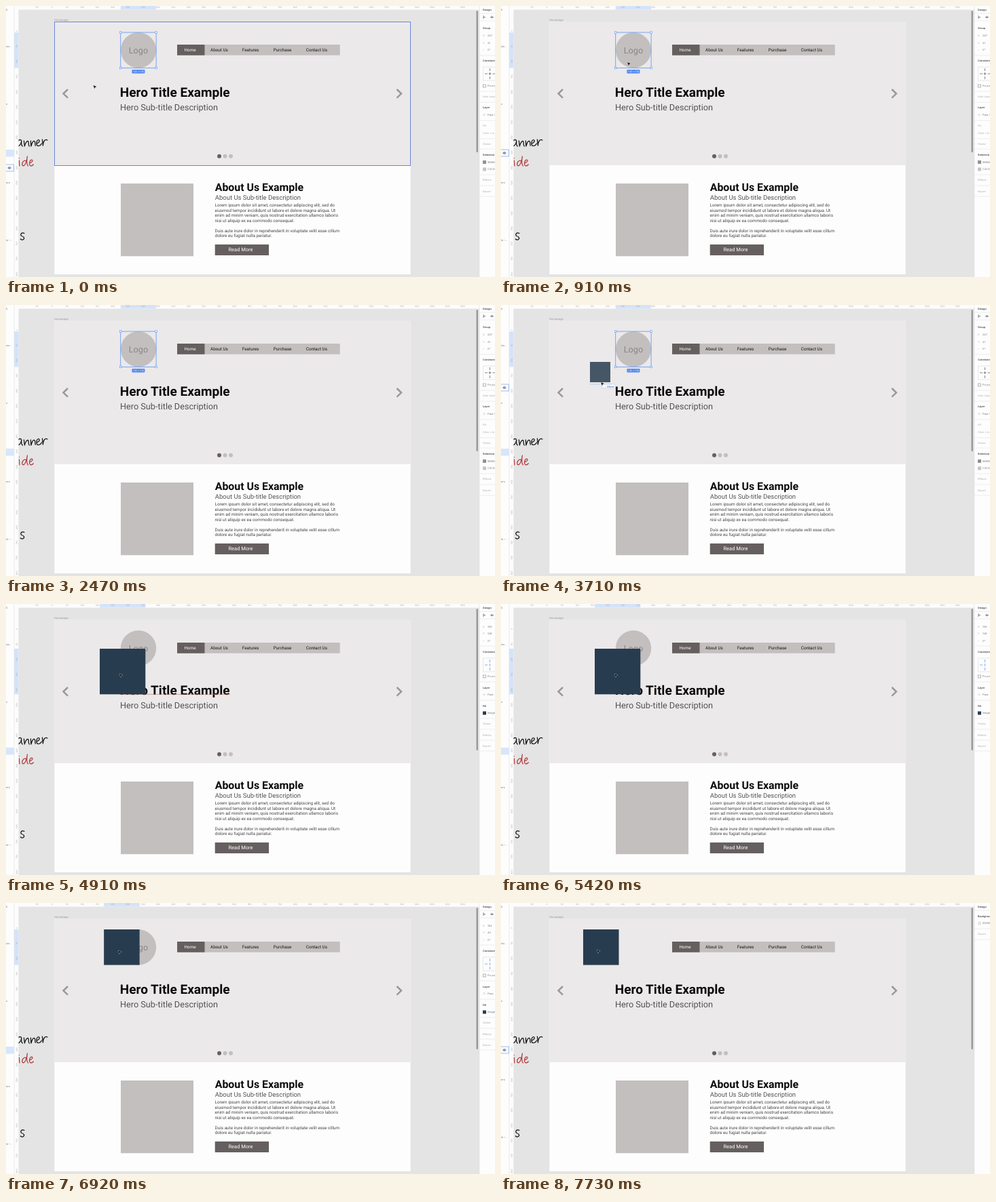
Recreate the animation shown at these times as an HTML page. Size 720x400 px, loop 8000 ms.

```html
<!DOCTYPE html>
<html lang="en">
<head>
<meta charset="utf-8">
<title>Wireframe editor</title>
<style>
  html, body { margin: 0; width: 100%; height: 100%; overflow: hidden; background: #e4e4e4; }
  svg { display: block; width: 720px; height: 400px; }
  text { font-family: Roboto, sans-serif; text-rendering: geometricPrecision; }
  .b { font-weight: 700; }
  .ui text { font: 3.8px Inter, sans-serif; fill: #777; }
  .ui .h { font-weight: 600; fill: #444; }
  .ui .dim { fill: #aaa; }
  .body text { font-size: 6.35px; fill: #444; }
  .nav text { font-size: 6.35px; fill: #161414; }
  .ink { fill: none; stroke: #111; stroke-width: 1.25; stroke-linecap: round; stroke-linejoin: round; }
</style>
</head>
<body>
<svg viewBox="0 0 720 400" xmlns="http://www.w3.org/2000/svg">
  <rect width="720" height="400" fill="#e4e4e4"/>

  <g class="ink" transform="translate(-.6 0)">
    <path d="M23 198C19 196 16 201 17 205C18 209 23 205 23.500 199C23 203 23 206 25 207M27 199L28 207C29 202 32 198 33.500 200C34.500 202 33 206 35 207M37 199L37.500 207C39 201 41 198 43 200C44 202 43 205 44 206M46 203C50 202 51 198 48.500 197.500C45 198 44.500 206 48 206.500C50 206.500 52 205 53 203M54 197L55 206C55 200 58 196 61.500 198"/>
    <path stroke="#b03a3c" d="M20 228L20.500 236M20 224.500v.2M31 229C27 226 23 232 25 235.500C28 237 31 231 32 222C31 228 31 234 33 236M35 232C39 231 41 228 38.500 227C35 227 34 235 37 236C39 236 40 235 41 234"/>
    <path d="M27.500 335.500C23.500 333.500 21 337.500 23.500 339.500C27.500 340.500 28.500 343.500 25.500 345C24 345.500 22.500 344.500 22 344"/>
  </g>

  <rect x="71.300" y="23" width="524.400" height="373" fill="#fefdfd"/>
  <rect x="71.300" y="23" width="524.400" height="212" fill="#ebe9ea"/>
  <text x="71" y="21.800" font-size="4" fill="#999" style="font-family:Inter,sans-serif">Homepage</text>

  <g id="logo">
    <circle cx="195" cy="65.200" r="26.200" fill="#c3bfbf"/>
    <text x="180.700" y="69.500" font-size="12.700" fill="#8a8686">Logo</text>
  </g>

  <g class="nav">
    <rect x="252" y="57" width="239.700" height="15.700" fill="#c3bfbf"/>
    <rect x="252" y="57" width="40.500" height="15.700" fill="#665f60"/>
    <text x="262.500" y="67" style="fill:#fff">Home</text>
    <text x="301" y="67">About Us</text>
    <text x="347.800" y="67">Features</text>
    <text x="393.800" y="67">Purchase</text>
    <text x="441.800" y="67">Contact Us</text>
  </g>

  <path d="M91 123L84.500 129.300L91 135.600M575.500 123L582 129.300L575.500 135.600" fill="none" stroke="#9c9899" stroke-width="2.500"/>
  <text class="b" x="167.800" y="133.500" font-size="19.050" fill="#0b0a0a">Hero Title Example</text>
  <path id="underline" d="M168 133.300H330" stroke="#b98a74" stroke-width=".7"/>
  <text x="168" y="154" font-size="12.700" fill="#565253">Hero Sub-title Description</text>
  <circle cx="314" cy="221.800" r="3" fill="#665f60"/>
  <circle cx="322.500" cy="221.800" r="3" fill="#c3bfbf"/>
  <circle cx="331" cy="221.800" r="3" fill="#c3bfbf"/>

  <rect x="169" y="262" width="107" height="107.300" fill="#c3bfbf"/>
  <text class="b" x="307.700" y="273.100" font-size="15.880" fill="#0b0a0a">About Us Example</text>
  <text x="307.700" y="285.700" font-size="9.530" fill="#565253">About Us Sub-title Description</text>
  <g class="body">
    <text x="307.600" y="296.300">Lorem ipsum dolor sit amet, consectetur adipiscing elit, sed do</text>
    <text x="307.600" y="303.750">eiusmod tempor incididunt ut labore et dolore magna aliqua. Ut</text>
    <text x="307.600" y="311.200">enim ad minim veniam, quis nostrud exercitation ullamco laboris</text>
    <text x="307.600" y="318.650">nisi ut aliquip ex ea commodo consequat.</text>
    <text x="307.600" y="333.550">Duis aute irure dolor in reprehenderit in voluptate velit esse cillum</text>
    <text x="307.600" y="341">dolore eu fugiat nulla pariatur.</text>
  </g>
  <rect x="307.700" y="352" width="79.300" height="16" fill="#665f60"/>
  <text x="327.500" y="362.400" font-size="7.500" fill="#fff">Read More</text>

  <rect id="hover" x="71.500" y="23.500" width="524" height="212" fill="none" stroke="#6d86d8"/>
  <rect id="image" fill="#283c4f"/>
  <path id="guides" d="M252.400 5V39M71 72H219" stroke="#a9c4ee" stroke-width=".8" stroke-dasharray="2 1"/>

  <g id="select">
    <rect id="frame" fill="none" stroke="#6b9cf0" stroke-width=".9"/>
    <g id="handles" fill="#fff" stroke="#6b9cf0" stroke-width=".7"></g>
    <g id="badge">
      <rect x="-9.500" y="2.700" width="19" height="5.300" rx=".8" fill="#4f86ee"/>
      <text id="size" y="6.700" font-size="3.800" fill="#fff" text-anchor="middle"></text>
    </g>
  </g>

  <g id="drag">
    <rect x="-16" y="-30" width="30" height="30" fill="#283c4f" opacity=".85"/>
    <path d="M-17 2.800H16" stroke="#9bb4dd" stroke-width=".6"/>
    <rect x="2" y="3" width="19" height="6" fill="#fafcff" stroke="#b5c4de" stroke-width=".5"/>
    <text x="4" y="7.600" font-size="4.200" fill="#3c65b0">→ Move</text>
  </g>

  <rect x="692.500" y="7" width="2.500" height="209" rx="1.200" fill="#999"/>

  <g class="ui">
    <rect width="697" height="5.500" fill="#fcfcfc"/>
    <rect x="12" y="5" width="6.500" height="395" fill="#fcfcfc"/>
    <rect id="markX" height="5.500" fill="#d5e3fa"/>
    <rect id="markY" x="12" width="6.500" fill="#d5e3fa"/>
    <g id="ruler"></g>

    <rect width="12" height="400" fill="#fdfdfd"/>
    <path d="M12 0V400" stroke="#e2e2e2" stroke-width=".7"/>
    <rect id="row" y="212" width="12" height="10.500" fill="#d8e6fc"/>
    <text y="61.200">sio…</text>
    <text y="7">5</text>
    <text y="145.500">n</text>
    <g id="lower"><text y="261.500">ers</text><text y="346.500">le –…</text></g>
    <g id="eye">
      <rect x="-1" y="-5" width="12.500" height="10" fill="#f8faff" stroke="#8db0ee" stroke-width=".8"/>
      <ellipse cx="5" rx="2" ry="1.300" fill="none" stroke="#444" stroke-width=".7"/>
      <circle cx="5" r=".7" fill="#444"/>
    </g>

    <rect x="697" width="23" height="400" fill="#fdfdfd"/>
    <path d="M697 0V400" stroke="#e2e2e2" stroke-width=".7"/>
    <text class="h" x="702" y="6.500">Design</text>
    <g id="group"></g>
    <g id="photo"></g>
    <g id="page"></g>
  </g>

  <path id="cursor" d="M0 0L5 2L2.700 2.900L1.800 5.200Z" fill="#1b1b1b" stroke="#fff" stroke-width=".5" paint-order="stroke"/>
</svg>

<script>
const LOOP = 8000;
const $ = id => document.getElementById(id);
const set = (id, attrs) => { for (const k in attrs) $(id).setAttribute(k, attrs[k]); };
const show = (id, on) => { $(id).style.display = on ? '' : 'none'; };
const move = (id, x, y) => $(id).setAttribute('transform', `translate(${x} ${y})`);
const within = (t, ...spans) => spans.some(([a, b]) => t >= a && t < b);

// Each key: time, then values; equal neighbours make a rest.
const cursorKeys = [
  [0, 128.5, 117], [150, 128.5, 117], [910, 186, 83], [1420, 186, 83],
  [1690, 150, 150], [1960, 150, 150], [2470, -8, 398], [3290, 8, 358],
  [3710, 147, 114], [4280, 171, 100], [4400, 171, 100], [4910, 167, 103],
  [5540, 167, 103], [5900, 248, 76], [6080, 285.5, 105.5], [6500, 271.5, 91.5],
  [6620, 240, 70], [7060, 142, 70], [7220, 190, 72], [7340, 190, 72],
  [7580, 141, 69], [LOOP, 141, 69]
];
const imageKeys = [
  [4400, 138, 66, 67.3], [5540, 138, 66, 67.3], [5900, 219, 39, 67.3],
  [6080, 219, 39, 67.3], [6500, 219, 39, 52.5], [6620, 219, 39, 52.5],
  [7060, 121, 39, 52.5], [LOOP, 121, 39, 52.5]
];
const eyeKeys = [[0, 239], [700, 217], [1420, 239], [1960, 345], [2470, -20],
  [3500, 122], [4280, -20], [7580, 217]];

function at(keys, t) {
  const i = keys.findIndex(k => k[0] > t);
  if (i < 1) return keys[i ? keys.length - 1 : 0].slice(1);
  const a = keys[i - 1], b = keys[i];
  const p = (t - a[0]) / (b[0] - a[0]);
  const e = p * p * (3 - 2 * p);
  return a.slice(1).map((v, n) => v + (b[n + 1] - v) * e);
}

function panel(id, rows, lines) {
  const text = rows.map(([y, s, c = '', x = 702]) =>
    `<text class="${c}" x="${x}" y="${y + 1.4}">${s}</text>`).join('');
  const rules = lines.map(y => `M697 ${y}H720`).join('');
  $(id).innerHTML = `<path d="${rules}" stroke="#e6e6e6" stroke-width=".7"/>${text}`;
}

const box = (y, cross, c) => `<rect x="702.500" y="${y}" width="21" height="20" fill="none" stroke="#ddd" stroke-width=".7"/>
  <path d="M712.500 ${y + 2}v4m0 2v4m0 2v4M705 ${y + 10}h4${cross ? 'm1.500 0h4m2 0h4' : ''}" stroke="${c}" stroke-width=".8"/>`;
const check = y => `<rect x="702.500" y="${y - 2}" width="4" height="4" fill="none" stroke="#888" stroke-width=".6"/>`;
const align = '<path d="M703 14v5m0-2.500h3M713 16.500h5m-2.500-2v4" stroke="#666" stroke-width=".8"/>';
const swatch = (y, c) => `<rect x="702" y="${y - 2.5}" width="5" height="5" fill="${c}"/>`;
const place = (x, y) => [[x, 'X', 'dim'], [x + 10.5, 'Y', 'dim'], [y, '⌐', 'dim'], [y, '0°', '', 709]];

panel('group', [
  [33, 'Group', 'h'], ...place(44, 65), [44, '247', '', 709], [54.5, '41', '', 709],
  [81, 'Constraints', 'h'], [118, 'Fix pos', '', 709], [134, 'Auto Layout', 'dim'],
  [150, 'Layer', 'h'], [160.5, '◇', 'dim'], [160.5, 'Pass T', '', 709], [177, 'Fill', 'dim'],
  [187.5, 'Click + to', 'dim'], [203.5, 'Stroke', 'dim'], [219.5, 'Selection c', 'h'],
  [230.5, '9B9B9B', '', 709], [241, 'C4C4C4', '', 709], [257, 'Effects', 'dim'], [273.5, 'Export', 'dim']
], [11, 22, 73, 126, 142, 169, 196, 211, 249, 265, 281]);
$('group').innerHTML += align + box(90, true, '#666') + check(118) + swatch(230.5, '#929292') + swatch(241, '#c4c4c4');

panel('photo', [
  ...place(33.5, 54.5), [33.5, '<tspan id="px"/>', '', 709], [44, '<tspan id="py"/>', '', 709],
  [70.5, 'Constraints', 'h'], [107, 'Fix pos', '', 709], [123.5, 'Layer', 'h'],
  [134, '◇', 'dim'], [134, 'Pass', '', 709], [150.5, 'Fill', 'h'], [161, 'Image', '', 709],
  [177, 'Stroke', 'dim'], [193.5, 'Effects', 'dim'], [209.5, 'Export', 'dim']
], [11, 22, 62, 115, 142, 169, 185, 201, 217]);
$('photo').innerHTML += align + box(80, false, '#6b9cf0') + check(107) + swatch(161, '#283c4f');

panel('page', [[19.5, 'Background', 'h'], [30, 'E5E5E5', '', 709], [46, 'Export', 'dim']], [11, 38, 54]);
$('page').innerHTML += swatch(30, '#e5e5e5');

let marks = '';
for (let i = 0; i < 29; i++)
  marks += `<text class="dim" x="${45 + i * 22.4}" y="2.600" text-anchor="middle" style="font-size:3.200px">${i * 50 - 50}</text>`;
for (let i = 0; i < 17; i++)
  marks += `<text class="dim" transform="translate(16.500 ${37 + i * 22.4}) rotate(-90)" text-anchor="middle" style="font-size:3.200px">${i * 50}</text>`;
$('ruler').innerHTML = marks;

for (let i = 0; i < 4; i++)
  $('handles').innerHTML += '<rect x="-1.300" y="-1.300" width="2.600" height="2.600"/>';

function select(x, y, w) {
  set('frame', { x, y, width: w, height: w });
  [...$('handles').children].forEach((h, i) =>
    h.setAttribute('transform', `translate(${x + w * (i % 2)} ${y + w * (i >> 1)})`));
  move('badge', x + w / 2, y + w);
  const n = Math.round(w * 2.52);
  $('size').textContent = `${n} × ${n}`;
  set('markX', { x, width: w });
  set('markY', { y, height: w });
}

function draw(t) {
  const [cx, cy] = at(cursorKeys, t);
  const [x, y, w] = at(imageKeys, t);
  const placed = t >= 4400;
  const onImage = within(t, [4400, 7220]);
  const any = t < 7730;

  move('cursor', cx, cy);
  show('cursor', !within(t, [2470, 3290]));
  move('drag', cx, cy);
  show('drag', within(t, [3290, 4400]));

  set('image', { x, y, width: w, height: w });
  show('image', placed);
  show('logo', any);
  if (onImage) select(x, y, w); else select(168.7, 39, 52.4);
  show('select', any && !within(t, [4800, 5900], [6620, 7060]));
  show('markX', any);
  show('markY', any);

  show('hover', within(t, [0, 600], [1420, 2300]));
  show('underline', within(t, [4800, 5420]));
  show('guides', within(t, [5840, 6200]));

  show('row', !within(t, [700, 1420]) && any);
  move('lower', 0, onImage ? 10 : 0);
  move('eye', 0, eyeKeys.filter(k => k[0] <= t).pop()[1]);

  show('group', any && !onImage);
  show('photo', onImage);
  show('page', !any);
  $('px').textContent = Math.round((x - 71) * 2.52);
  $('py').textContent = Math.round((y - 23) * 2.52);
}

const start = performance.now();
function tick() {
  draw((performance.now() - start) % LOOP);
  requestAnimationFrame(tick);
}
tick();
</script>
</body>
</html>
```
